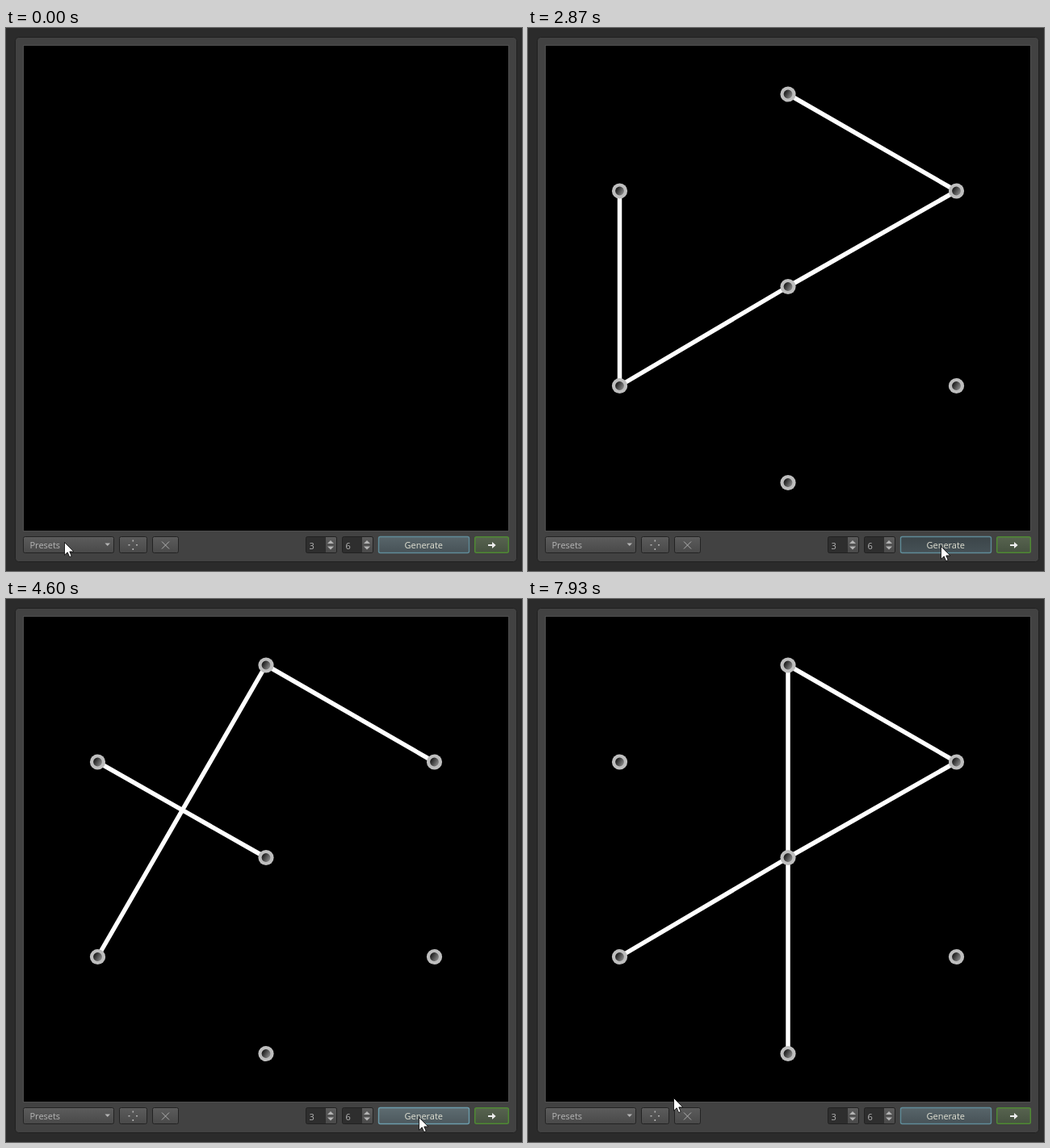
These frames come from a looping animation (639 by 673 pixels, 8000 ms). An HTML page:

```html
<!DOCTYPE html>
<html lang="en">
<head>
<meta charset="utf-8">
<title>Glyph generator</title>
<style>
  html, body { margin: 0; width: 100%; height: 100%; overflow: hidden; background: #2b2b2b; }
  svg { display: block; width: 639px; height: 673px; }
  text { font: 11px "Open Sans", "Noto Sans", sans-serif; fill: #b6b6b6; }
  .btn { fill: url(#grey); stroke: #232323; }
  .icon { fill: none; stroke: #b0b0b0; }
  .solid { fill: #b4b4b4; }
  #lines { stroke: #fff; stroke-width: 5.5; }
  #generate { fill: url(#blue); stroke: #5f8b98; stroke-width: 1.4; }
  #generate.hover { fill: url(#blueHover); stroke: #6b9cab; }
  #generate.down { fill: url(#blueDown); }
</style>
</head>
<body>
<svg viewBox="0 0 639 673" xmlns="http://www.w3.org/2000/svg">
  <defs>
    <linearGradient id="grey" x2="0" y2="1"><stop stop-color="#5c5c5c"/><stop offset="1" stop-color="#494949"/></linearGradient>
    <linearGradient id="blue" x2="0" y2="1"><stop stop-color="#58656a"/><stop offset="1" stop-color="#475257"/></linearGradient>
    <linearGradient id="blueHover" x2="0" y2="1"><stop stop-color="#5e6c71"/><stop offset="1" stop-color="#4c585d"/></linearGradient>
    <linearGradient id="blueDown" x2="0" y2="1"><stop stop-color="#3b4549"/><stop offset="1" stop-color="#465156"/></linearGradient>
    <linearGradient id="green" x2="0" y2="1"><stop stop-color="#57634f"/><stop offset="1" stop-color="#465240"/></linearGradient>
    <linearGradient id="hole" x1="0" y1=".2" x2="1" y2=".8"><stop offset=".1" stop-color="#1c1c1c"/><stop offset="1" stop-color="#929292"/></linearGradient>
  </defs>

  <rect width="639" height="673" fill="#2b2b2b"/>
  <rect x="11.5" y="11.5" width="621" height="650" rx="4" fill="#424242" stroke="#202020"/>
  <rect x="21.5" y="21.5" width="601" height="602" stroke="#4e4e4e"/>

  <g id="lines"></g>
  <g id="dots"></g>

  <rect id="presets" class="btn" x="21.5" y="630.5" width="112" height="20" rx="2"/>
  <text x="29.5" y="645">Presets</text>
  <path class="solid" d="M122.5 638.5h6.5l-3.25 3.5z"/>

  <rect class="btn" x="140.5" y="630.5" width="34" height="20" rx="2"/>
  <path class="solid" d="M156.5 634.5h1.6v2h-1.6z M156.5 645h1.6v2h-1.6z M151.5 640h2v1.6h-2z M161 640h2v1.6h-2z"/>
  <rect class="btn" x="181.5" y="630.5" width="32" height="20" rx="2"/>
  <path class="icon" d="M193 636.5l9 9m0-9l-9 9"/>

  <g id="spins"></g>

  <rect id="generate" x="461.5" y="630.5" width="112" height="20" rx="2"/>
  <text x="493.5" y="645" style="fill:#e2e2d4">Generate</text>

  <rect x="580.7" y="630.7" width="41.6" height="19.6" rx="2" fill="url(#green)" stroke="#4f8a33" stroke-width="1.5"/>
  <path d="M597 639.9h5v-3l4.6 4.1-4.6 4.1v-3h-5z" fill="#eee"/>

  <g id="menu" visibility="hidden">
    <rect x="21.5" y="515.5" width="119" height="114" fill="#3c3c3c" stroke="#1c1c1c"/>
    <rect id="mark" x="23" width="116" height="22" fill="#5b6a70"/>
  </g>

  <path id="cursor" d="M.5.5V16.2L4.2 12.8 6.7 18.6 9.2 17.5 6.8 11.9H11.8Z" fill="#fff" stroke="#000" stroke-width=".8"/>
</svg>

<script>
const NS = 'http://www.w3.org/2000/svg';
const LOOP = 8000, LAST_TICK = 119, TICKS_PER_MS = 0.015;
const MENU_TOP = 518, ROW = 22;
const $ = id => document.getElementById(id);

function add(parent, tag, attrs, text) {
  const el = document.createElementNS(NS, tag);
  for (const key in attrs) el.setAttribute(key, attrs[key]);
  if (text) el.textContent = text;
  parent.append(el);
  return el;
}

// top, upper left, upper right, centre, lower left, lower right, bottom
const nodes = [[322, 82], [113.5, 202], [530.5, 202], [322, 320.5],
               [113.5, 443.5], [530.5, 443.5], [322, 563.5]];

// press tick, release tick, node pairs joined on release
const clicks = [
  [27, 28, '02 14 36'],
  [29, 30, '13 35 46 25'],
  [31, 33, '03 34 35 36 25'],
  [34, 35, '14 01 32'],
  [36, 38, '05 46 13'],
  [40, 41, '02 23 34 14'],
  [42, 44, '16 03 25'],
  [45, 46, '04 32 56'],
  [47, 49, '01 13 36 25'],
  [50, 51, '05 56'],
  [54, 56, '13 35 25'],
  [58, 59, '14 03 36 34'],
  [63, 65, '02 13 46 35'],
  [68, 69, '04 02 13'],
  [72, 74, '02 26 34 36'],
  [76, 78, '01 04 35 25'],
  [82, 84, '16 46 26 35'],
  [90, 91, '03 32 25 34'],
  [97, 98, '13 36 25 46'],
  [107, 108, '03 02 23 34 36']
];

// tick, x, y of the pointer tip
const path = [[0, 72, 637], [2, 72, 637], [12, 97, 529], [18, 97, 529], [24, 511, 642],
              [116, 511, 642], [117, 462, 640], [118, 325, 631], [119, 180, 618]];

const ease = p => p * p * (3 - 2 * p);

function pointerAt(tick) {
  const i = Math.max(1, path.findIndex(k => k[0] >= tick));
  const [t0, x0, y0] = path[i - 1], [t1, x1, y1] = path[i];
  const p = ease((tick - t0) / (t1 - t0));
  return [x0 + (x1 - x0) * p, y0 + (y1 - y0) * p];
}

const dots = nodes.map(([x, y]) => {
  const g = add($('dots'), 'g', { transform: `translate(${x} ${y})` });
  add(g, 'circle', { r: 9.6, fill: '#bebebe' });
  add(g, 'circle', { r: 5.4, fill: 'url(#hole)' });
  return g;
});

[[371.5, '3'], [416.5, '6']].forEach(([x, value]) => {
  const g = add($('spins'), 'g', { transform: `translate(${x} 630.5)` });
  add(g, 'rect', { width: 38, height: 20, rx: 2, fill: '#2e2e2e', stroke: '#212121' });
  add(g, 'path', { d: 'M24.5.5H36q1.5 0 1.5 1.5v16q0 1.5-1.5 1.5H24.5z', fill: 'url(#grey)' });
  add(g, 'path', { d: 'M26.5 8.5h8l-4-4z M26.5 12h8l-4 4z', class: 'solid' });
  add(g, 'text', { x: 4, y: 15.2 }, value);
});

['Hexagon', 'Square', 'Grid', 'Circle', 'Triangle'].forEach((name, i) =>
  add($('menu'), 'text', { x: 32, y: MENU_TOP + ROW * i + 15 }, name));

const show = (el, on) => el.setAttribute('visibility', on ? 'visible' : 'hidden');

function drawLines(pairs) {
  $('lines').replaceChildren();
  for (const [a, b] of pairs.split(' ').filter(Boolean)) {
    const [x1, y1] = nodes[a], [x2, y2] = nodes[b];
    add($('lines'), 'line', { x1, y1, x2, y2 });
  }
}

function draw(tick) {
  const [x, y] = pointerAt(tick);
  $('cursor').setAttribute('transform', `translate(${Math.round(x)} ${Math.round(y)})`);

  const menuOpen = tick >= 2 && tick < 18;
  const row = Math.floor((y - MENU_TOP) / ROW);
  show($('menu'), menuOpen);
  show($('mark'), menuOpen && row < 5);
  $('mark').setAttribute('y', MENU_TOP + ROW * row);
  $('presets').style.fill = tick >= 1 && tick < 18 ? '#404040' : '';

  dots.forEach(dot => show(dot, tick >= 18));

  const done = clicks.filter(c => c[1] <= tick).pop();
  drawLines(done ? done[2] : '');

  const over = x >= 461 && x < 574 && y >= 630;
  const down = clicks.some(c => c[0] <= tick && tick < c[1]);
  $('generate').setAttribute('class', down ? 'down' : over ? 'hover' : '');
}

let shown = -1;
function frame() {
  const t = performance.now() % LOOP;
  const tick = Math.min(LAST_TICK, Math.floor(t * TICKS_PER_MS + 0.1));
  if (tick !== shown) draw(shown = tick);
  requestAnimationFrame(frame);
}
frame();
</script>
</body>
</html>
```
